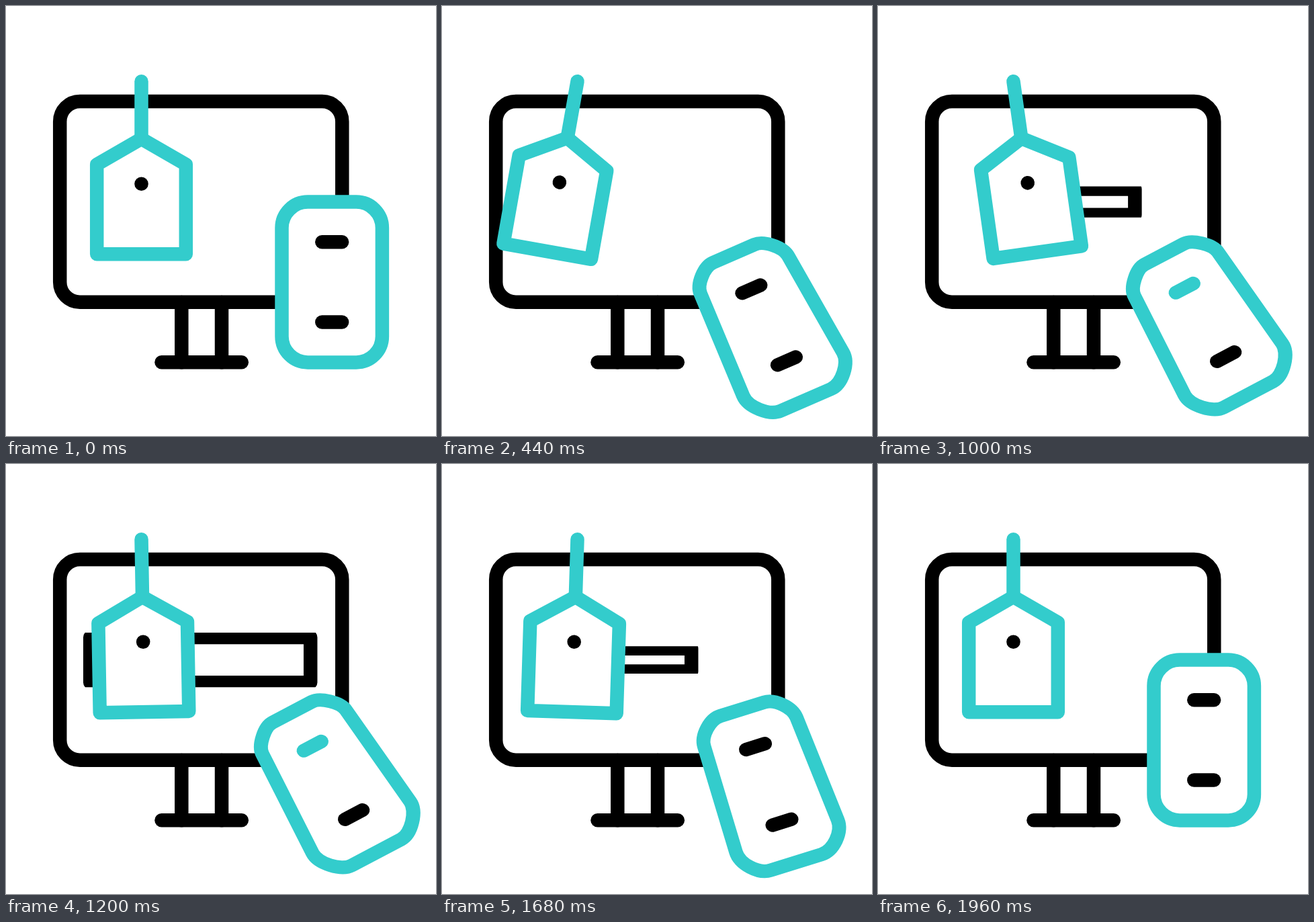
An HTML page with a canvas that plays this animation: 640 by 640 pixels, repeating every 2 s.

```html
<!DOCTYPE html>
<html lang="en">
<head>
<meta charset="utf-8">
<title>Online shopping icon</title>
<style>
  html, body { margin: 0; width: 100%; height: 100%; overflow: hidden; background: #fff; }
  canvas { display: block; width: 100vw; height: 100vh; }
</style>
</head>
<body>
<canvas id="stage"></canvas>
<script>
const LOOP = 2000, STEP = 40, SIZE = 640;
const BLACK = '#000', TEAL = '#33cccc', WHITE = '#fff';
const canvas = document.getElementById('stage');
const ctx = canvas.getContext('2d');
const ratio = window.devicePixelRatio || 1;
canvas.width = canvas.height = SIZE * ratio;

// Tracks are [time, value] pairs, eased in and out between keys.
const swing = [[80, 0], [520, 11], [1000, -8], [1400, 6], [1840, 0]];
const tilt = [[80, 0], [560, 1], [1480, 1], [1960, 0]];
const drop = [[80, 0], [340, 76], [440, 64], [900, 60], [1600, 60], [1800, 77], [1960, 0]];
const grow = [[760, 0], [1200, 1], [1480, 1], [1880, 0]];
const PRESS = 600, RELEASE = 1480;

function track(keys, t) {
  if (t <= keys[0][0]) return keys[0][1];
  for (let i = 1; i < keys.length; i++) {
    const [t0, a] = keys[i - 1], [t1, b] = keys[i];
    if (t < t1) {
      const u = (t - t0) / (t1 - t0);
      return a + (b - a) * u * u * (3 - 2 * u);
    }
  }
  return keys[keys.length - 1][1];
}

const rad = deg => deg * Math.PI / 180;

function line(color, ...pts) {
  ctx.strokeStyle = color;
  ctx.beginPath();
  pts.forEach(([x, y]) => ctx.lineTo(x, y));
  ctx.stroke();
}

function monitor() {
  ctx.strokeStyle = BLACK;
  ctx.beginPath();
  ctx.roundRect(80.2, 142.1, 420.1, 298.6, 29.8);
  ctx.stroke();
  line(BLACK, [261.3, 441], [261.3, 530.2]);
  line(BLACK, [321, 441], [321, 530.2]);
  line(BLACK, [231.5, 530.2], [350.8, 530.2]);
}

function banner(s) {
  if (s <= 0) return;
  const cx = 289.2, cy = 291.6, w = 164 * s, h = 33.7 * s, clip = 40.6 * s;
  ctx.save();
  ctx.beginPath();
  ctx.rect(0, cy - clip, SIZE, clip * 2);
  ctx.clip();
  ctx.strokeStyle = BLACK;
  ctx.strokeRect(cx - w, cy - h, w * 2, h * 2);
  ctx.restore();
}

function tag(deg) {
  ctx.save();
  ctx.translate(201.5, 112.2);
  ctx.rotate(rad(deg));
  ctx.beginPath();
  [[0, 85.5], [66.3, 123.6], [66.3, 257], [-66.3, 257], [-66.3, 123.6]]
    .forEach(([x, y]) => ctx.lineTo(x, y));
  ctx.closePath();
  ctx.fillStyle = WHITE;
  ctx.fill();
  ctx.strokeStyle = TEAL;
  ctx.stroke();
  line(TEAL, [0, 0], [0, 85]);
  ctx.fillStyle = BLACK;
  ctx.beginPath();
  ctx.arc(0, 152.6, 10.3, 0, Math.PI * 2);
  ctx.fill();
  ctx.restore();
}

// Point at distance d from a towards b.
function toward(a, b, d) {
  const dx = b[0] - a[0], dy = b[1] - a[1], n = d / Math.hypot(dx, dy);
  return [a[0] + dx * n, a[1] + dy * n];
}

// The tilted phone widens at its lower end and its corners flatten.
function phoneBody(k) {
  const topW = 74.7 - 7 * k, lowW = 74.7 + 10.5 * k;
  const topY = -119.4 + 0.8 * k, lowY = 119.4 + 5.5 * k;
  const pts = [[-topW, topY], [topW, topY], [lowW, lowY], [-lowW, lowY]];
  const bend = 0.552 - 0.15 * k;
  ctx.beginPath();
  pts.forEach((p, i) => {
    const prev = pts[(i + 3) % 4], next = pts[(i + 1) % 4];
    const r = 38.6 + (i < 2 ? -4 : 5) * k, hold = r * (1 - bend);
    ctx.lineTo(...toward(p, prev, r));
    ctx.bezierCurveTo(...toward(p, prev, hold), ...toward(p, next, hold), ...toward(p, next, r));
  });
  ctx.closePath();
}

function phone(k, dy, pressed) {
  ctx.save();
  ctx.translate(485.2 + 1.8 * k, 411 + dy);
  ctx.rotate(rad(-31 * k));
  ctx.transform(1, 0.055 * k, 0, 1, 0, 0);
  phoneBody(k);
  ctx.fillStyle = WHITE;
  ctx.fill();
  ctx.strokeStyle = TEAL;
  ctx.stroke();
  line(pressed ? TEAL : BLACK, [-14.9, -59.7], [14.9, -59.7]);
  line(BLACK, [-14.9, 59.5], [14.9, 59.5]);
  ctx.restore();
}

function draw(t) {
  ctx.setTransform(ratio, 0, 0, ratio, 0, 0);
  ctx.fillStyle = WHITE;
  ctx.fillRect(0, 0, SIZE, SIZE);
  ctx.lineWidth = 20.5;
  ctx.lineCap = ctx.lineJoin = 'round';
  monitor();
  banner(track(grow, t));
  tag(track(swing, t));
  phone(track(tilt, t), track(drop, t), t >= PRESS && t < RELEASE);
}

const start = performance.now();
function tick() {
  const t = (performance.now() - start) % LOOP;
  draw(Math.floor(t / STEP) * STEP);
  requestAnimationFrame(tick);
}
tick();
</script>
</body>
</html>
```
